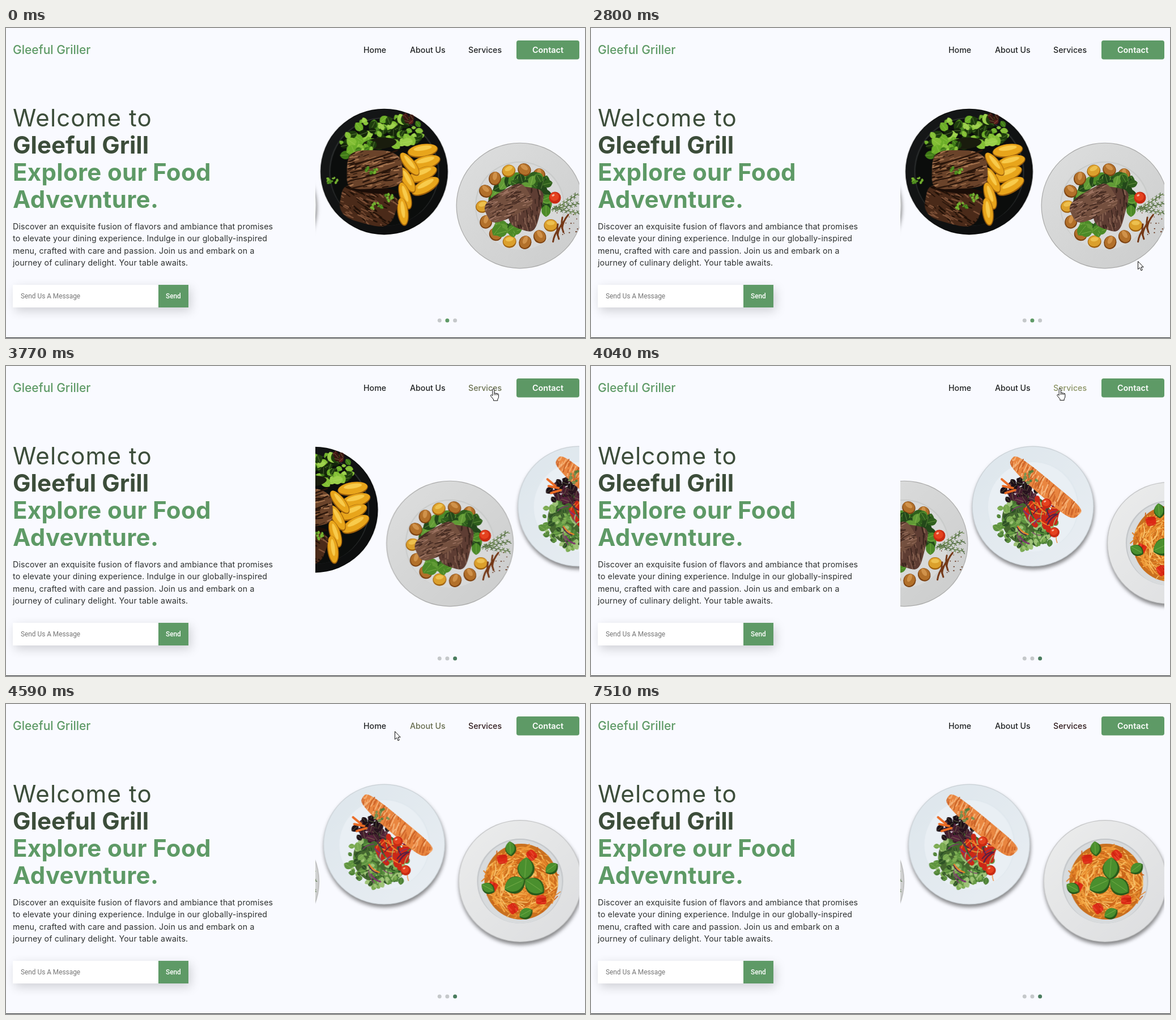
Animation, 1022 px wide and 548 px high, one loop 8 s. Source, as an HTML page with a canvas:

```html
<!DOCTYPE html>
<html lang="en">
<head>
<meta charset="utf-8">
<title>Restaurant landing page</title>
<style>
  html, body { margin: 0; width: 100%; height: 100%; overflow: hidden; background: #f9faff; }
  #stage { position: absolute; left: 0; top: 0; width: 1022px; height: 548px; overflow: hidden; }
  #stage > svg { position: absolute; left: 0; top: 0; }
  #slider { position: absolute; left: 546px; top: 120px; width: 466px; height: 330px; overflow: hidden; }
  #slider canvas { position: absolute; left: 0; top: 0; }
  #form { position: absolute; left: 12px; top: 454px; width: 310px; height: 40px; background: #fff; box-shadow: 4px 6px 18px rgba(0, 0, 0, .17); }
  #form i { position: absolute; left: 257px; top: 0; width: 53px; height: 40px; background: #5e9a66; }
  text { font-family: Inter, "Open Sans", sans-serif; white-space: pre; }
  .logo { font-size: 21px; font-weight: 500; fill: #5e9a66; }
  .nav { font-size: 14.2px; font-weight: 500; }
  .head { font-size: 42px; font-weight: 700; fill: #3c4d3a; }
  .light { font-weight: 400; letter-spacing: 1.1px; }
  .green { fill: #5e9a66; letter-spacing: .3px; }
  .body { font-size: 14.2px; letter-spacing: .16px; fill: #2d302f; }
  .field { font-family: Roboto, "Liberation Sans", sans-serif; font-size: 11.85px; }
</style>
</head>
<body>
<div id="stage">
  <div id="form"><i></i></div>
  <svg width="1022" height="548">
    <text class="logo" x="12" y="46">Gleeful Griller</text>
    <g id="nav" class="nav"></g>
    <rect id="button" x="901" y="22" width="111" height="33.5" rx="4"/>
    <text x="956.5" y="44" text-anchor="middle" font-size="14.4" font-weight="600" fill="#fff">Contact</text>
    <text class="head" y="174">
      <tspan class="light" x="12">Welcome to</tspan>
      <tspan x="12" dy="48">Gleeful Grill</tspan>
      <tspan class="green" x="12" dy="48">Explore our Food</tspan>
      <tspan class="green" x="12" dy="48">Advevnture.</tspan>
    </text>
    <text class="body" y="356">
      <tspan x="12">Discover an exquisite fusion of flavors and ambiance that promises</tspan>
      <tspan x="12" dy="1.507em">to elevate your dining experience. Indulge in our globally-inspired</tspan>
      <tspan x="12" dy="1.507em">menu, crafted with care and passion. Join us and embark on a</tspan>
      <tspan x="12" dy="1.507em">journey of culinary delight. Your table awaits.</tspan>
    </text>
    <text class="field" x="26" y="478" fill="#757575">Send Us A Message</text>
    <text class="field" x="282" y="478" fill="#fff" font-weight="500">Send</text>
    <g id="dots"></g>
    <rect y="547" width="1022" height="1" fill="#2b2d2e"/>
  </svg>
  <div id="slider"></div>
  <svg width="1022" height="548">
    <g id="cursor" fill="#fff" stroke="#111" stroke-linejoin="round">
      <path id="arrow" d="M.5 .5V14.6L3.7 11.6L6 16.8L8.2 15.8L6 10.7H10.2Z"/>
      <path id="hand" d="M-1.7 1.6a1.6 1.6 0 0 1 3.2 0V7.6q1.4-1 2.7.4q1.4-.9 2.6.5q2.2-.6 2.2 1.8V14q0 2.5-1.7 4v2.6H0V18.5L-4.8 12.6q-.8-1.8.8-2.2q1 0 2.3 1.6ZM1.5 7.6V11M4.2 8V11M6.8 8.5V11"/>
    </g>
  </svg>
</div>
<script>
const LOOP = 8000, SHIFT = 466.5, SLIDE_START = 3569, SIZE = 250, TAU = Math.PI * 2;
const $ = id => document.getElementById(id);
const clamp = v => Math.max(0, Math.min(1, v));
const polar = (x, y, r, a) => [x + Math.cos(a) * r, y + Math.sin(a) * r];

// ---------- drawing helpers ----------
let ctx, seed;
function rnd(a = 0, b = 1) {
  seed = (seed * 16807) % 2147483647;
  return a + (b - a) * seed / 2147483647;
}
const pick = list => list[Math.floor(rnd(0, list.length))];
const times = (n, fn) => { for (let i = 0; i < n; i++) fn(i); };

function oval(x, y, rx, ry, fill, turn = 0) {
  ctx.beginPath();
  ctx.ellipse(x, y, rx, ry, turn, 0, TAU);
  ctx.fillStyle = fill;
  ctx.fill();
}
function line(x, y, len, ang, width, color, bend = 0) {
  const dx = Math.cos(ang) * len / 2, dy = Math.sin(ang) * len / 2;
  ctx.beginPath();
  ctx.moveTo(x - dx, y - dy);
  ctx.quadraticCurveTo(x - dy * bend, y + dx * bend, x + dx, y + dy);
  ctx.lineWidth = width;
  ctx.strokeStyle = color;
  ctx.stroke();
}
function leaf(x, y, len, ang, fill, fat = .5) {
  const h = len / 2;
  ctx.save();
  ctx.translate(x, y);
  ctx.rotate(ang);
  ctx.beginPath();
  ctx.moveTo(-h, 0);
  ctx.bezierCurveTo(-h * .5, -len * fat, h * .5, -len * fat, h, 0);
  ctx.bezierCurveTo(h * .5, len * fat, -h * .5, len * fat, -h, 0);
  ctx.fillStyle = fill;
  ctx.fill();
  line(0, 0, len * .8, 0, .7, "rgba(190,225,120,.5)");
  ctx.restore();
}
function leaves(n, x, y, rx, ry, min, max, colors) {
  times(n, () => {
    const a = rnd(0, TAU), r = Math.sqrt(rnd());
    leaf(x + Math.cos(a) * rx * r, y + Math.sin(a) * ry * r, rnd(min, max), rnd(0, TAU), pick(colors));
  });
}
// uneven rounded block of meat or fish with grain strokes inside
function chunk(x, y, rx, ry, turn, [base, dark, light], grain, count) {
  ctx.save();
  ctx.translate(x, y);
  ctx.rotate(turn);
  ctx.beginPath();
  times(40, i => {
    const a = i / 40 * TAU, c = Math.cos(a), s = Math.sin(a), k = 1 + .04 * Math.sin(a * 3 + x);
    ctx.lineTo(rx * k * Math.sign(c) * Math.abs(c) ** .55, ry * k * Math.sign(s) * Math.abs(s) ** .55);
  });
  ctx.fillStyle = base;
  ctx.fill();
  ctx.clip();
  times(count, i => line(rnd(-rx, rx), rnd(-ry, ry), rnd(4, 16), grain + rnd(-.25, .25), rnd(.8, 2.6), i % 2 ? dark : light));
  ctx.restore();
}
function wedge(x, y, rx, ry, turn, [edge, body, shine]) {
  oval(x, y + 1, rx, ry, edge, turn);
  oval(x, y, rx - 1, ry - 1.5, body, turn);
  oval(x, y - ry * .3, rx * .6, ry * .35, shine, turn);
}
function tomato(x, y, r) {
  oval(x, y, r, r, "#c92a12");
  oval(x - r * .1, y - r * .15, r * .75, r * .7, "#e5421f");
  oval(x - r * .3, y - r * .4, r * .25, r * .16, "#f7b39b", -.5);
}
function plate(r, well, edge, face, inner, shade) {
  ctx.save();
  ctx.shadowColor = shade;
  ctx.shadowBlur = 6;
  ctx.shadowOffsetX = 1;
  ctx.shadowOffsetY = 5;
  oval(0, 0, r, r * .99, edge);
  ctx.restore();
  const g = ctx.createLinearGradient(-r, -r, r, r);
  face.forEach((c, i) => g.addColorStop(i, c));
  oval(0, 0, r - 1.2, r * .99 - 1.2, g);
  oval(0, 0, well + 2, well + 1, inner[0]);
  oval(0, 1, well, well, inner[1]);
}

// ---------- dishes ----------
const GREENS = ["#2f5f1d", "#4c8a28", "#23481a", "#619b36"];

function grill() {
  plate(112.5, 95, "#050606", ["#17191a", "#0b0c0c"], ["#2a2d2d", "#0b0d0c"], "transparent");
  const bright = ["#3f7a17", "#6cae28", "#1e3d0d", "#83bf35", "#14250a", "#9bd04a"];
  leaves(80, 6, -70, 66, 27, 8, 22, bright);
  leaves(22, -58, -48, 18, 24, 9, 22, bright);
  leaves(7, 36, -91, 16, 9, 8, 14, ["#5b1a1a", "#3a1512"]);
  oval(-8, -50, 30, 10, "#191c0d", -.1);
  leaves(12, -35, -44, 28, 7, 8, 18, bright);
  const gold = ["#9c5d0a", "#e8a51b", "#f8cb4c"];
  times(4, i => wedge(68 + i % 2 * 5, -38 + i * 21, 27, 12, -.15 - i * .12, gold));
  times(4, i => wedge(45 - i * 4, -14 + i * 28, 25, 10, .9 + i * .18, gold));
  const meat = ["#6a432a", "#25130a", "#a87650"];
  chunk(-28, 60, 50, 31, .25, ["#4a2a19", "#1f1007", "#805339"], .3, 110);
  oval(-22, 32, 46, 6, "#1a0d07", .1);
  chunk(-18, -3, 49, 34, -.02, meat, -.3, 130);
  times(4, i => line(-18, -25 + i * 14, 86, -.3, 2.5, "#2a160b", .1));
  [[-22, -3], [-14, 61], [8, 46], [-92, 15]].forEach(([x, y]) => leaves(9, x, y, 10, 6, 4, 9, ["#6cab27", "#417f16"]));
}
function roast() {
  plate(112.5, 77, "#a9a9a8", ["#dedfdf", "#cbcccc"], ["#c9cbca", "#d8d9d9"], "transparent");
  const brown = ["#7d4312", "#b2702a", "#d0924a"], gold = ["#a06210", "#dba02c", "#edc04f"];
  times(24, i => {
    const a = 1.7 + i * .2;
    leaf(...polar(0, -2, 47, a), rnd(20, 32), a + rnd(.5, 2), pick(GREENS), .42);
  });
  times(12, i => wedge(...polar(-1, 0, 65, .55 + i * .43), 12, 11, i, i % 3 ? brown : gold));
  leaves(18, 22, -40, 30, 14, 14, 24, GREENS);
  leaves(10, -20, 40, 24, 9, 14, 24, GREENS);
  leaves(6, 47, -4, 7, 20, 14, 22, GREENS);
  chunk(11, 5, 27, 38, .25, ["#5e3d33", "#38231c", "#85604f"], 1.2, 70);
  chunk(-20, -4, 42, 24, -.5, ["#74503f", "#452b22", "#9b7260"], .1, 100);
  times(5, i => line(80 - i * 4, 28 + i * 6, 26, 2 - i % 2 * .5, 3, "#743817", .3));
  times(14, () => oval(rnd(55, 102), rnd(10, 52), rnd(.5, 1.3), 1, "#65341d"));
  times(3, k => {
    const a = -.6 + k * .4;
    line(82, -7 + k * 8, 50, a, 1.2, "#536b3d");
    times(12, i => line(...polar(82, -7 + k * 8, i * 4 - 22, a), 11, a + (i % 2 ? .8 : -.8), 1.2, pick(["#4b683c", "#6f8954"])));
  });
  tomato(62, -14, 10.5);
}
function salmon() {
  plate(107.5, 79, "#c9d0d5", ["#dde6ec", "#e9eef3"], ["#e0e8ee", "#e9eff4"], "rgba(60,60,60,.6)");
  const frill = ["#4c8136", "#77a850", "#2e5226", "#9cc177", "#5f9440"];
  oval(-10, 24, 45, 44, "#45672f", .6);
  leaves(120, -12, 28, 56, 42, 7, 17, frill);
  leaves(30, -2, 62, 34, 16, 7, 15, frill);
  leaves(60, -24, -25, 30, 22, 7, 16, ["#2b1420", "#431d2e", "#57233c", "#1d1018"]);
  times(3, i => line(-48 + i * 4, -42 + i * 8, 18, .7 - i * .5, 4, "#ea6b25"));
  times(7, i => line(-4 + i * 8, rnd(-2, 32), 32, 1 + i * .15, 9, "#cb2717", .3));
  times(34, () => line(rnd(-35, 45), rnd(-5, 65), rnd(12, 25), rnd(0, 3), rnd(1.2, 2.8), pick(["#7e356e", "#552047", "#ee812b", "#4c8136", "#9cc177"]), .4));
  chunk(23, -32, 77, 15, .7, ["#e98640", "#d0672b", "#f7b77d"], 1.3, 110);
  times(6, i => line(-22 + i * 18, -72 + i * 15, 24, 2, 2, "#c55d22", .3));
  leaves(12, 0, -50, 20, 12, 4, 8, ["#4e7034", "#70864a"]);
  tomato(24, -5, 9);
  tomato(38, 46, 9);
}
function pasta() {
  plate(109, 74, "#c2c3c4", ["#eceded", "#dcdddf"], ["#c3c6c9", "#d8dbdd"], "rgba(60,60,60,.6)");
  oval(2, 1, 65, 67, "#c9701f");
  const tones = ["#f4aa48", "#e38329", "#f9c26a", "#ee9736", "#cc6219"];
  times(400, () => {
    const a = rnd(0, TAU);
    line(...polar(2, 1, Math.sqrt(rnd()) * 60, a), rnd(14, 34), a + 1.57 + rnd(-.8, .8), rnd(1.2, 2.4), pick(tones), rnd(-.7, .7));
  });
  times(5, i => chunk(...polar(0, 0, 50, .73 + i * 1.1), 9, 8, i, ["#dc2b16", "#c8230f", "#e8452b"], 0, 8));
  const basil = (x, y, len, a) => {
    leaf(x + 1, y + 1.5, len + 2, a, "#27591a");
    leaf(x, y, len, a, "#4a8f2e", .44);
  };
  times(4, i => basil(...polar(0, -2, 59, 1.41 + i * 1.5), 24, i - .5));
  times(3, i => basil(...polar(8, -3, 20, -1.5 + i * 2.1), 38, -1.5 + i * 2.1));
}

// [painter, centre x, centre y]
const dishes = [[pasta, 439, 313], [grill, 667.5, 254], [roast, 907, 314], [salmon, 1134, 248], [pasta, 1374, 313]]
  .map(([paint, x, y], i) => {
    const el = document.createElement("canvas");
    el.width = el.height = SIZE;
    ctx = el.getContext("2d");
    ctx.translate(SIZE / 2, SIZE / 2);
    ctx.lineCap = "round";
    seed = 4321 + (i % 4) * 977;
    paint();
    $("slider").append(el);
    return { el, x: x - 546 - SIZE / 2, y: y - 120 - SIZE / 2 };
  });

// ---------- motion ----------
// pointer key points: time, x, y
const path = [
  [260, 981, 536], [470, 976, 480], [2799, 976, 480], [2800, 965, 412], [3340, 936, 44], [3550, 885, 41], [4028, 828, 40],
  [4574, 686, 48], [5200, 648, 44], [6007, 888, 401], [6076, 902, 406], [6820, 968, 486], [7450, 983, 543]
];
function pointer(t) {
  const i = Math.max(1, path.findIndex(p => p[0] >= t));
  const [t0, x0, y0] = path[i - 1], [t1, x1, y1] = path[i], k = clamp((t - t0) / (t1 - t0));
  return [x0 + (x1 - x0) * k, y0 + (y1 - y0) * k];
}
function over(h, t) {
  const [x, y] = pointer(t);
  return y < 47 && x >= h.x && x <= h.right;
}
// finds when the pointer enters and leaves a link
function withHover(h) {
  const inside = Array.from({ length: 300 }, (_, i) => 2800 + i * 10).filter(t => over(h, t));
  return { ...h, on: inside[0], off: inside[inside.length - 1] };
}
// CSS "ease": cubic-bezier(.25, .1, .25, 1)
function ease(x) {
  let lo = 0, hi = 1, s;
  times(24, () => {
    s = (lo + hi) / 2;
    if (.75 * s * (1 - s) + s ** 3 < x) lo = s; else hi = s;
  });
  return .3 * s * (1 - s) ** 2 + 3 * (1 - s) * s * s + s ** 3;
}
function tick(t) {
  if (t < 260) return 0;
  if (t < 2800) return 260 + Math.floor((Math.min(t, 470) - 260) / 70) * 70;
  return 2800 + Math.floor((t - 2792) / 68.25) * 68.25;
}
const glow = (t, h) => clamp((Math.min(t, h.off) - h.on) / 150) * (1 - clamp((t - h.off) / 300));
const mix = (a, b, k) => `rgb(${a.map((v, i) => Math.round(v + (b[i] - v) * k))})`;

// ---------- page parts ----------
function svg(parent, tag, attrs) {
  const el = document.createElementNS("http://www.w3.org/2000/svg", tag);
  for (const k in attrs) el.setAttribute(k, attrs[k]);
  parent.append(el);
  return el;
}
const links = [["Home", 631, 672], ["About Us", 713, 775], ["Services", 816, 874]].map(([label, x, right]) => {
  const el = svg($("nav"), "text", { x, y: 44 });
  el.textContent = label;
  return withHover({ el, x, right, after: label === "Services" ? [48, 27, 28] : [33, 35, 36] });
});
const contact = withHover({ x: 901, right: 1012 });
const dots = [0, 1, 2].map(i => svg($("dots"), "circle", { cx: 765.2 + i * 13.7, cy: 517, r: 3.5 }));

function draw(time) {
  const t = tick(time);
  const dx = SHIFT * ease(clamp((t - SLIDE_START) / 1000));
  for (const d of dishes) d.el.style.transform = `translate(${d.x - dx}px, ${d.y}px)`;
  const slid = t > SLIDE_START;
  dots.forEach((d, i) => d.setAttribute("fill", i === (slid ? 2 : 1) ? (slid ? "#4a7c5e" : "#5e9a66") : "#c5c8ca"));
  for (const h of links)
    h.el.setAttribute("fill", mix(t > h.off ? h.after : [33, 35, 36], [138, 146, 98], glow(t, h)));
  $("button").setAttribute("fill", mix([94, 154, 102], [76, 128, 86], glow(t, contact)));

  const shown = t >= 260 && time < 7510;
  $("cursor").style.display = shown ? "" : "none";
  if (!shown) return;
  const pointing = [...links, contact].some(h => over(h, t));
  $("cursor").setAttribute("transform", `translate(${pointer(t)})`);
  $("hand").style.display = pointing ? "" : "none";
  $("arrow").style.display = pointing ? "none" : "";
}

const start = performance.now();
function frame() {
  draw((performance.now() - start) % LOOP);
  requestAnimationFrame(frame);
}
frame();
</script>
</body>
</html>
```
